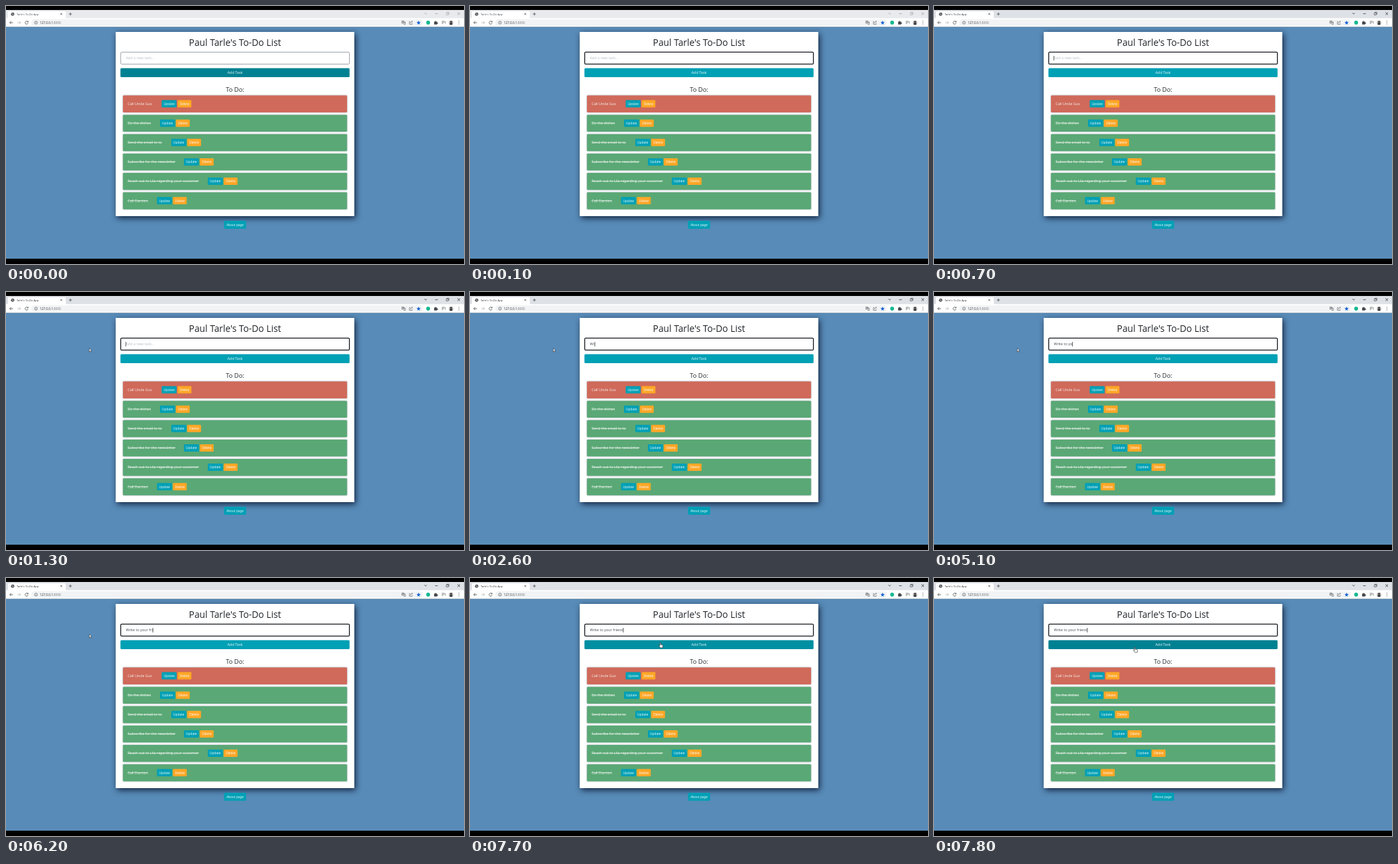
Animation of 690 by 388 pixels, one loop 8 s. Source, as an HTML page:

```html
<!DOCTYPE html>
<html lang="en">
<head>
<meta charset="utf-8">
<title>To-Do List</title>
<style>
  html, body { margin: 0; width: 100%; height: 100%; overflow: hidden; background: #000; }
  svg { display: block; width: 690px; height: 388px; }
  text { font-family: "Open Sans", "Noto Sans", sans-serif; font-size: 5.5px; white-space: pre; }
  .mid { text-anchor: middle; }
  .head { font-weight: 500; fill: #212529; text-anchor: middle; }
  .btn { font-size: 4.8px; fill: #f4fbfc; text-anchor: middle; }
  .done { text-decoration: line-through; }
  .line { fill: none; stroke: #4a4d51; stroke-width: .8; }
  #card { filter: drop-shadow(2px 3px 5px rgba(5, 15, 40, .85)); }
  .row { filter: drop-shadow(0 0 1.2px rgba(90, 110, 130, .6)); }
</style>
</head>
<body>
<svg viewBox="0 0 690 388">
  <rect width="690" height="388"/>
  <!-- browser window -->
  <rect id="strip" y="6" width="690" height="13"/>
  <path d="M1 19q2 0 2-2v-7q0-2 2-2h83q2 0 2 2v7q0 2 2 2z" fill="#fff"/>
  <circle cx="10" cy="12.2" r="2.5" fill="#4f5358"/>
  <path d="M8.4 11.2q1.6-.6 1.4 1t1.8 1" class="line" style="stroke:#dfe1e4;stroke-width:.7"/>
  <text id="tab" x="16" y="13.8" style="font-size:4.15px">Tarle's To-Do App</text>
  <path d="M82 10.8l2.6 2.6m0-2.6l-2.6 2.6M94.7 12.1h4.6m-2.3-2.3v4.6" class="line"/>
  <g id="win" class="line">
    <path d="M630.4 10.4l1.8 1.8 1.8-1.8M646.5 11.6h4M680.2 9.6l3.8 3.8m0-3.8l-3.8 3.8"/>
    <path d="M663.2 10.4h3v3h-3zM664.3 10.2v-.9h3v3h-.9" stroke-width=".6"/>
  </g>
  <rect y="18.3" width="690" height="13.4" fill="#fff"/>
  <rect x="38" y="20" width="590" height="10" rx="5" fill="#f1f3f4"/>
  <g class="line">
    <path d="M10.6 25H5.6m2.3-2.3L5.6 25l2.3 2.3"/>
    <path d="M17 25h5m-2.3-2.3L22 25l-2.3 2.3" stroke="#b4b7bb"/>
    <path d="M32.9 23.6a2.3 2.3 0 1 0 .4 1.9M33.3 22.4v1.6h-1.7"/>
    <circle cx="45.2" cy="25" r="2.2" stroke-width=".6"/>
    <path d="M45.2 24.7v1.4M45.2 23.6v.5" stroke-width=".6"/>
    <path d="M596.4 22.6h3.2v3.4h-3.2zM599 24.2h2.6v3.2h-2.6M597.2 23.8h1.6m-.8 0v1.4" stroke-width=".6"/>
    <path d="M609 23.4h-1.2v4h4.2v-1.4M609.3 25.8q.2-2.2 3-2.4m-1-1.1l1.1 1.1-1.1 1.2" stroke-width=".6"/>
    <path d="M656.6 23h4m-4 1.7h3m-3 1.7h2M661.6 23v3.4" stroke-width=".7"/>
  </g>
  <path d="M621.6 21.9l.9 2.1 2.3.2-1.8 1.5.6 2.2-2-1.2-2 1.2.6-2.2-1.8-1.5 2.3-.2z" fill="#1a66d2"/>
  <circle cx="636" cy="25" r="2.9" fill="#17b890"/>
  <path d="M645 23.5h1.4a.9.9 0 1 1 1.8 0h1.3v1.4a.9.9 0 1 1 0 1.6v1.2H645z" fill="#45484c"/>
  <circle cx="670.5" cy="25" r="3.3" fill="#b7b4b1"/>
  <path d="M668.2 27.4q.3-2.2 2.3-2.2t2.3 2.2q-2.3 1.8-4.6 0z" fill="#303236"/>
  <circle cx="670.5" cy="23.9" r="1.4" fill="#303236"/>
  <path d="M682.3 22.7v.1m0 2.1v.1m0 2.1v.1" stroke="#45484c" stroke-width="1" stroke-linecap="round"/>
  <text x="51" y="26.7" style="font-size:4.7px" fill="#2b2e32">127.0.0.1<tspan fill="#74787d">:8000</tspan></text>
  <!-- page -->
  <rect y="31.5" width="690" height="348.5" fill="#588bb8"/>
  <rect id="card" x="165.3" y="39" width="359.4" height="277" fill="#fff"/>
  <text class="head" x="345" y="60.3" style="font-size:13.8px">Paul Tarle's To-Do List</text>
  <rect id="field" x="172.8" y="69.4" width="344.6" height="18" rx="1.6" fill="#fff"/>
  <text id="entry" x="180.4" y="80.3"></text>
  <rect id="caret" y="75" width=".7" height="7" fill="#222"/>
  <rect id="add" x="172.4" y="93.5" width="345.2" height="13.5" rx="1.5"/>
  <text class="mid" x="345" y="102.3" fill="#f4fbfc">Add Task</text>
  <text class="head" x="345" y="128.6" style="font-size:9.4px">To Do:</text>
  <g id="list"></g>
  <rect x="328.5" y="323" width="33.2" height="12" rx="1.4" fill="#00a0b5"/>
  <text class="btn" x="345" y="330.8">About page</text>
  <!-- pointers -->
  <path id="arrow" d="M0 0v5.2l1.2-1.1.9 2 .9-.4-.9-1.9h1.6z" fill="#fff" stroke="#222" stroke-width=".5"/>
  <path id="hand" d="M0 .4q.7-.8 1.3 0v2.7l2.6.7q.7.3.6 1.2l-.6 2.9H.6L-1.6 5q-.2-1 .7-.8l.9.7z" fill="#fff" stroke="#222" stroke-width=".6"/>
</svg>
<script>
const LOOP = 8000, STEP = 100;
const $ = id => document.getElementById(id);
const teal = [0, 160, 181], deep = [0, 129, 146];
const mix = k => `rgb(${teal.map((c, i) => c + (deep[i] - c) * k)})`;

// label and left edge of its first button
const tasks = [
  ['Call Uncle Gus', 234.5], ['Do the dishes', 232], ['Send the email to to', 249],
  ['Subscribe for the newsletter', 268],
  ['Reach out to Lila regarding your customer', 304], ['Call Damien', 227.5]
];
const button = (x, w, fill, label) =>
  `<rect x="${x}" y="7" width="${w}" height="11" rx="1.2" fill="${fill}"/>
   <text class="btn" x="${x + w / 2}" y="14.4">${label}</text>`;
$('list').innerHTML = tasks.map(([label, x], i) =>
  `<g transform="translate(0 ${134.5 + i * 29.15})">
     <rect class="row" x="176.2" width="337.6" height="25.4" rx="1.2" fill="${i ? '#5aa875' : '#d06a5a'}"/>
     <text class="${i ? 'done' : ''}" x="183.2" y="14.4" fill="#f6f8f6">${label}</text>
     ${button(x, 22.5, '#00a0b5', 'Update')}${button(x + 24, 20.8, '#ffa726', 'Delete')}
   </g>`).join('');

const phrase = 'Write to your friend';
const keys = [2400, 2600, 2700, 2800, 2865, 3495, 4300, 4400, 4600, 5000,
  5100, 5300, 5500, 5700, 5800, 6000, 6200, 6300, 6400, 6570];
const focusAt = 205, blink = 530;

// time, x, y of the pointer tip
const path = [[900, 170, 82], [1000, 147, 84.5], [1100, 129, 85.2], [1200, 125.4, 84.6],
  [7300, 125.4, 84.6], [7400, 139, 86], [7500, 184, 89], [7600, 245, 93],
  [7700, 286.2, 97], [7800, 302.2, 104]];

function pointerAt(t) {
  const i = path.findIndex(p => p[0] > t);
  if (i < 0) return path[path.length - 1].slice(1);
  if (!i) return null;
  const [a, b] = [path[i - 1], path[i]];
  const k = (t - a[0]) / (b[0] - a[0]);
  return [a[1] + (b[1] - a[1]) * k, a[2] + (b[2] - a[2]) * k];
}

function show(el, on) { el.setAttribute('visibility', on ? 'visible' : 'hidden'); }

function draw(t) {
  const active = t >= 300, focused = t >= 100;
  $('strip').setAttribute('fill', active ? '#dee1e6' : '#e8eaed');
  $('tab').setAttribute('fill', active ? '#34373b' : '#4c4f53');
  $('win').style.stroke = active ? '#303338' : '#a0a3a8';
  $('field').setAttribute('stroke', focused ? '#15181c' : '#85898e');
  $('field').setAttribute('stroke-width', focused ? 1.3 : .8);

  const typed = keys.filter(k => k <= t).length;
  const entry = $('entry');
  entry.textContent = typed ? phrase.slice(0, typed) : 'Add a new task...';
  entry.setAttribute('fill', typed ? '#43484d' : '#b9bdc2');
  const since = t - (typed ? keys[typed - 1] : focusAt);
  show($('caret'), since >= 0 && Math.floor(since / blink) % 2 === 0);
  $('caret').setAttribute('x', 180.4 + (typed ? entry.getComputedTextLength() : 0));

  const hover = t < 100 ? 1 : Math.min(1, Math.max(0, (t - 7620) / 150));
  $('add').setAttribute('fill', mix(hover));

  const tip = pointerAt(t), over = t >= 7600;
  show($('arrow'), tip && !over);
  show($('hand'), tip && over);
  if (tip) $(over ? 'hand' : 'arrow').setAttribute('transform', `translate(${tip})`);
}

const start = performance.now();
function tick() {
  const t = (performance.now() - start) % LOOP;
  draw(Math.floor(t / STEP) * STEP);
  requestAnimationFrame(tick);
}
tick();
</script>
</body>
</html>
```
